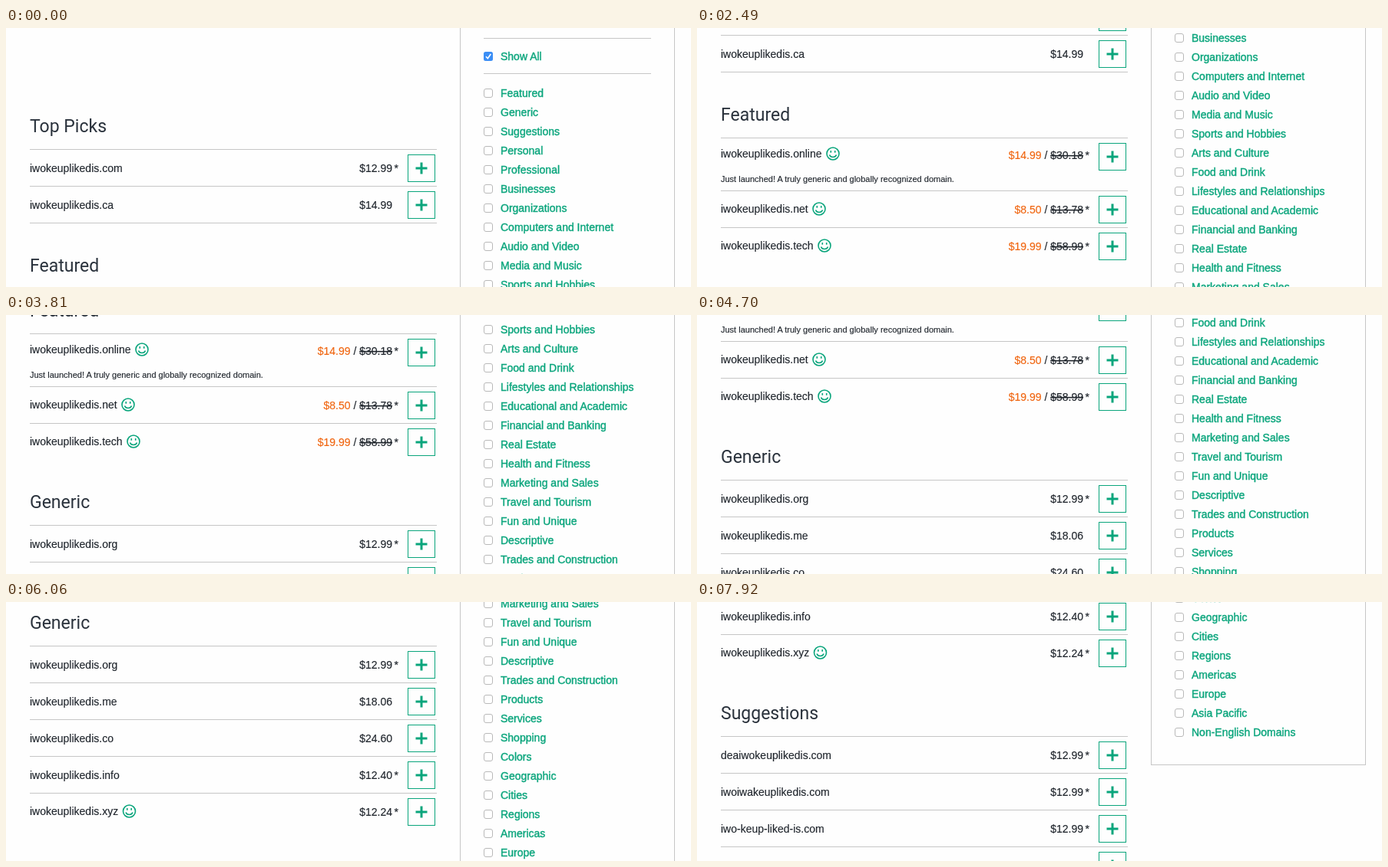
Recreate the animation shown at these times as an HTML page. Size 892 by 338 pixels, loop 8 s.

```html
<!DOCTYPE html>
<html lang="en">
<head>
<meta charset="utf-8">
<title>Domain search results</title>
<style>
  html, body { margin: 0; width: 100%; height: 100%; overflow: hidden; background: #fefefe; }
  svg { display: block; width: 892px; height: 338px; }
  text { font: 14px "Liberation Sans", Arial, sans-serif; fill: #20262d; white-space: pre; stroke: #20262d; stroke-width: .15px; }
  .head { font: 23px Roboto, sans-serif; fill: #2a323c; stroke: none; }
  .note { font-size: 11px; }
  .sale { fill: #f0650f; stroke: #f0650f; }
  .old { text-decoration: line-through; }
  .link { fill: #0aa57c; stroke: #0aa57c; stroke-width: .4px; }
  .end { text-anchor: end; }
  .rule { fill: #c6c6c6; }
  .box { fill: #fff; stroke: #b9b9b9; }
  .green { fill: none; stroke: #0aa57c; }
</style>
</head>
<body>
<svg viewBox="0 0 892 338"><g id="page"></g></svg>
<script>
const LOOP = 8000;

// Scroll flicks: first step time, last step time, steps, end position
const flicks = [
  [90, 430, 5, 36], [970, 1770, 10, 123], [2130, 2750, 8, 210],
  [3110, 3810, 9, 316], [4250, 4880, 8, 378], [5240, 5970, 9, 528],
  [6060, 6800, 9, 612], [6880, 7400, 7, 705], [7660, 7920, 4, 740]
];

// Rows: name, price, starred, old price, smiley x, note
const sections = [
  { title: "Top Picks", y: 158, closed: true, rows: [
    ["iwokeuplikedis.com", "$12.99", 1],
    ["iwokeuplikedis.ca", "$14.99"]] },
  { title: "Featured", y: 340, rows: [
    ["iwokeuplikedis.online", "$14.99", 1, "$30.18", 177,
      "Just launched! A truly generic and globally recognized domain."],
    ["iwokeuplikedis.net", "$8.50", 1, "$13.78", 159],
    ["iwokeuplikedis.tech", "$19.99", 1, "$58.99", 166]] },
  { title: "Generic", y: 590, rows: [
    ["iwokeuplikedis.org", "$12.99", 1],
    ["iwokeuplikedis.me", "$18.06"],
    ["iwokeuplikedis.co", "$24.60"],
    ["iwokeuplikedis.info", "$12.40", 1],
    ["iwokeuplikedis.xyz", "$12.24", 1, "", 160.5]] },
  { title: "Suggestions", y: 915, rows: [
    ["deaiwokeuplikedis.com", "$12.99", 1],
    ["iwoiwakeuplikedis.com", "$12.99", 1],
    ["iwo-keup-liked-is.com", "$12.99", 1],
    ["", "$12.99", 1]] }
];

const filters = ["Featured", "Generic", "Suggestions", "Personal", "Professional",
  "Businesses", "Organizations", "Computers and Internet", "Audio and Video",
  "Media and Music", "Sports and Hobbies", "Arts and Culture", "Food and Drink",
  "Lifestyles and Relationships", "Educational and Academic", "Financial and Banking",
  "Real Estate", "Health and Fitness", "Marketing and Sales", "Travel and Tourism",
  "Fun and Unique", "Descriptive", "Trades and Construction", "Products", "Services",
  "Shopping", "Colors", "Geographic", "Cities", "Regions", "Americas", "Europe",
  "Asia Pacific", "Non-English Domains"];

const text = (x, y, str, cls = "") => `<text x="${x}" y="${y}" class="${cls}">${str}</text>`;
const rule = (x, y, w, h = 1) => `<rect class="rule" x="${x}" y="${y}" width="${w}" height="${h}"/>`;

const smiley = (x, y) => `<g class="green" transform="translate(${x} ${y})" stroke-width="1.6">
  <circle r="8"/><path d="M-4.5 1.5a4.7 4.2 0 0 0 9 0M-2.7 -4v2.8M2.7 -4v2.8"/></g>`;

const addButton = y => `<g class="green"><rect x="523.5" y="${y + 7.5}" width="35" height="35"/>
  <path stroke-width="3" d="M533.5 ${y + 25}h15M541 ${y + 17.5}v15"/></g>`;

function row([name, price, star, old, smileX, note], y) {
  const nameY = y + (note ? 26 : smileX ? 29 : 30);
  const priceY = y + (note ? 28 : 30);
  const cost = old
    ? `<tspan class="sale">${price}</tspan> / <tspan class="old">${old}</tspan>`
    : price;
  return rule(31, y, 530) + text(31, nameY, name) + text(503, priceY, cost, "end") +
    (star ? text(505.5, priceY, "*") : "") +
    (smileX ? smiley(smileX, nameY - 5) : "") +
    (note ? text(31, y + 58, note, "note") : "") + addButton(y);
}

function section({ title, y, rows, closed }) {
  let out = text(31, y - 22, title, "head");
  for (const r of rows) {
    out += row(r, y);
    y += r[5] ? 69 : 48;
  }
  return out + (closed ? rule(31, y, 530) : "");
}

const filter = (label, y) =>
  `<rect class="box" x="622.5" y="${y - 5.5}" width="11" height="11" rx="2.5"/>` +
  text(644, y + 5, label, "link");

const sidebar = rule(591, 0, 1, 953) + rule(870, 0, 1, 953) + rule(591, 952, 280) +
  rule(622, 13, 218) + rule(622, 59, 218) +
  `<rect x="622" y="31" width="12" height="12" rx="2.5" fill="#3b8ef5"/>
   <path d="M625 37.3l2.3 2.5 4-5.8" fill="none" stroke="#fff" stroke-width="1.6"/>` +
  text(644, 42, "Show All", "link") +
  filters.map((label, i) => filter(label, 85 + 25 * i)).join("");

const page = document.getElementById("page");
page.innerHTML = sections.map(section).join("") + sidebar;

const ease = p => 1 - (1 - p) ** 3 * (1 + 3 * p);

function scrollAt(t) {
  let pos = 0;
  for (const [start, end, steps, to] of flicks) {
    if (t < start) break;
    const step = Math.floor((t - start) / (end - start) * (steps - 1) + 0.001) + 1;
    pos += (to - pos) * ease(Math.min(1, step / steps));
  }
  return Math.round(pos);
}

function draw() {
  page.setAttribute("transform", `translate(0 ${-scrollAt(performance.now() % LOOP)})`);
  requestAnimationFrame(draw);
}
draw();
</script>
</body>
</html>
```
